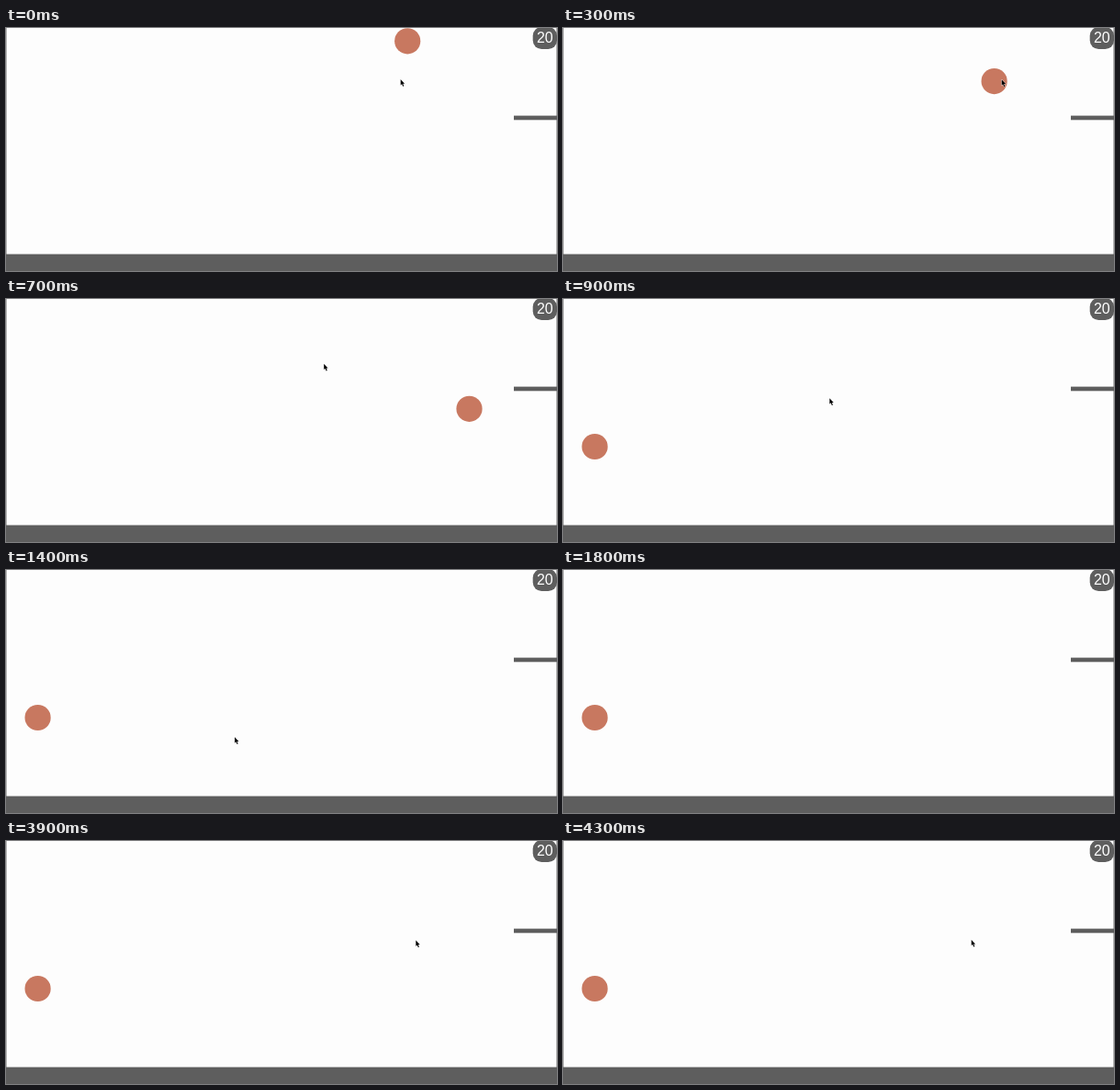
An HTML page for the animation above (8 s loop, 600 px wide and 265 px high).

```html
<!DOCTYPE html>
<html lang="en">
<head>
<meta charset="utf-8">
<title>Bouncing ball</title>
<style>
  html, body { margin: 0; width: 100%; height: 100%; overflow: hidden; background: #fdfdfd; }
  svg { display: block; width: 600px; height: 265px; }
  text { font: 16px "Liberation Sans", Arial, sans-serif; }
</style>
</head>
<body>
<svg viewBox="0 0 600 265">
  <rect width="600" height="265" fill="#fdfdfd"/>
  <path d="M.5 0V247M599.5 0V247" stroke="#b4b4b4"/>
  <g fill="#5e5e5e">
    <rect y="246.6" width="600" height="19"/>
    <rect x="553" y="95.6" width="47" height="4.7"/>
    <rect x="573.7" y="-1" width="26.3" height="24" rx="9.5"/>
  </g>
  <text x="586.8" y="16.4" text-anchor="middle" fill="#fff">20</text>
  <circle id="ball" r="14.1" fill="#c87860"/>
  <path id="cursor" d="M0 0V6.4L1.4 5.1L2.5 7.7L3.6 7.2L2.5 4.7H4.4Z"
        fill="#000" stroke="#fff" stroke-width=".7" paint-order="stroke"/>
</svg>
<script>
const LOOP = 8000, TICK = 100, LANDING = 900;
const ball = document.getElementById("ball");
const cursor = document.getElementById("cursor");

// Key points are [time, value...]; the motion between them is even.
const flight = [[0, 0], [300, 32.4], [700, 67.3], [800, 85.4]];

// Each stroke is one visit of the pointer, shown from its first key to `end`.
const strokes = [
  { end: 1800, keys: [[0, 429.7, 56], [300, 477.7, 56.2], [700, 346.2, 70.7],
                      [900, 290.3, 108.2], [1000, 262, 89.3], [1200, 183.3, 144.8],
                      [1300, 183.3, 144.8], [1600, 380.6, 257.2]] },
  { end: 2500, keys: [[2100, 402.7, 107], [2200, 403.3, 53.2]] },
  { end: LOOP, keys: [[3900, 446.3, 108.3], [4000, 446.3, 111],
                      [4100, 446.3, 111], [4300, 444.7, 107.7]] }
];

function along(keys, time) {
  const next = keys.findIndex(key => key[0] > time);
  if (next < 0) return keys.at(-1).slice(1);
  const [t0, ...from] = keys[next - 1];
  const [t1, ...to] = keys[next];
  const part = (time - t0) / (t1 - t0);
  return from.map((value, i) => value + (to[i] - value) * part);
}

function ballAt(time) {
  if (time >= LANDING) return [34.6, 161];
  const [u] = along(flight, time);
  return [437.2 + u, 14.3 + 1.15 * u + 0.0062 * u * u];
}

const moveTo = (el, [x, y]) => el.setAttribute("transform", `translate(${x} ${y})`);

function draw(now) {
  const time = Math.floor(now % LOOP / TICK) * TICK;
  moveTo(ball, ballAt(time));
  const stroke = strokes.find(({ keys, end }) => keys[0][0] <= time && time < end);
  cursor.setAttribute("visibility", stroke ? "visible" : "hidden");
  if (stroke) moveTo(cursor, along(stroke.keys, time));
}

const start = performance.now();
function frame() {
  draw(performance.now() - start);
  requestAnimationFrame(frame);
}
frame();
</script>
</body>
</html>
```
